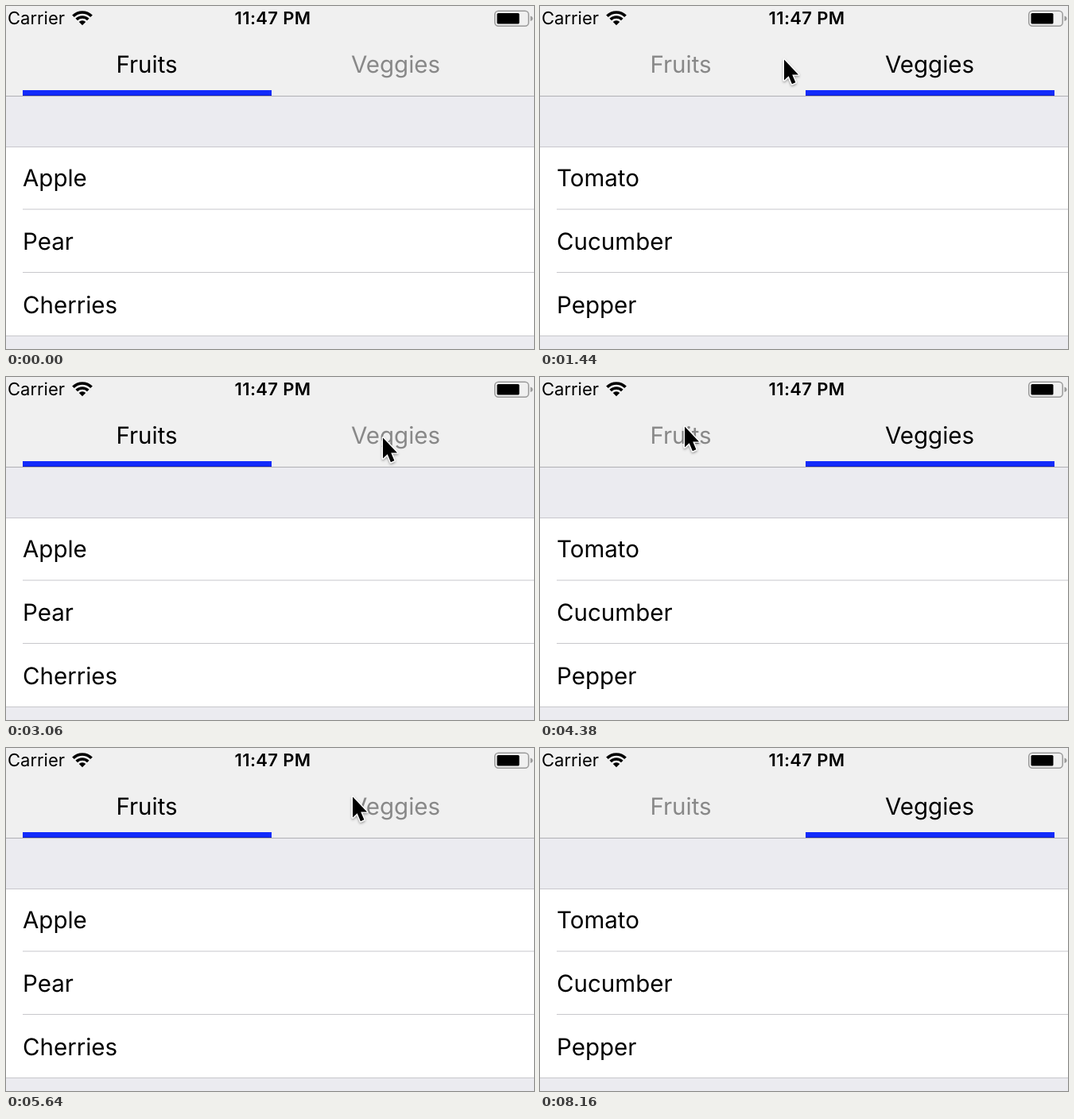
An HTML page that plays this animation: 664 by 432 pixels, repeating every 8280 ms.

```html
<!DOCTYPE html>
<html lang="en">
<head>
<meta charset="utf-8">
<title>Tabbed list</title>
<style>
  html, body { margin: 0; width: 100%; height: 100%; overflow: hidden; background: #ebebf0; }
  svg { display: block; width: 664px; height: 432px; }
  text { font-family: Inter, "Liberation Sans", sans-serif; font-size: 29.5px; text-rendering: geometricPrecision; }
  .status { font-size: 22px; }
  .clock { font-weight: 600; letter-spacing: .35px; }
  .mid { text-anchor: middle; }
  .rule { fill: #c8c7cc; }
</style>
</head>
<body>
<svg viewBox="0 0 664 432">
  <defs>
    <filter id="shadow" x="-50%" y="-30%" width="200%" height="170%">
      <feDropShadow dx="0" dy="1.5" stdDeviation="1.4" flood-color="#000" flood-opacity=".4"/>
    </filter>
  </defs>

  <rect width="664" height="432" fill="#ebebf0"/>
  <rect width="664" height="113" fill="#f0f0f0"/>
  <rect y="113" width="664" height="1" fill="#b0b0b4"/>

  <!-- Status bar -->
  <text class="status" x="2" y="23">Carrier</text>
  <g id="wifi" fill="none" stroke="#000" stroke-width="3.7"></g>
  <text class="status clock mid" x="335.5" y="23">11:47 PM</text>
  <rect x="614.75" y="6.25" width="42.5" height="19" rx="4.5" fill="none" stroke="#9a9a9a" stroke-width="1.5"/>
  <rect x="617.5" y="9" width="28" height="13.5" rx="1.5"/>
  <path d="M659.5 12.5q3 .8 3 3.3t-3 3.3z" fill="#9a9a9a"/>

  <!-- Tabs -->
  <text class="mid tab" x="177" y="84">Fruits</text>
  <text class="mid tab" x="490" y="84">Veggies</text>
  <g id="bar">
    <rect y="106" width="313" height="7" fill="#122bfb"/>
    <rect y="112" width="313" height="1" fill="#0d1cc4"/>
  </g>

  <!-- List -->
  <rect y="177" width="664" height="239" fill="#fff"/>
  <rect class="rule" y="177" width="664" height="1"/>
  <rect class="rule" x="21" y="255.5" width="643" height="1"/>
  <rect class="rule" x="21" y="335" width="643" height="1"/>
  <rect class="rule" y="415" width="664" height="1"/>
  <text class="row" x="21" y="227"></text>
  <text class="row" x="21" y="306.5"></text>
  <text class="row" x="21" y="386.5"></text>

  <g id="cursor" filter="url(#shadow)">
    <path d="M1.5 2.5V28.5L7.2 23.2L11.4 33.2L15.9 31.3L11.7 21.5H19.5Z"
      fill="#000" stroke="#fff" stroke-width="2.6" stroke-linejoin="round" paint-order="stroke"/>
  </g>
</svg>
<script>
const LOOP = 8280, STEP = 60;
const BAR = { left: 21, travel: 313, time: 290 };
const lists = [["Apple", "Pear", "Cherries"], ["Tomato", "Cucumber", "Pepper"]];

// Start times of the tab switches; they alternate between the two tabs.
const taps = [770, 2240, 3290, 4730, 6180];

// Pointer path: time, x, y.
const path = [
  [120, 611, 22], [360, 545, 54], [600, 496, 70], [900, 496, 70],
  [1440, 305.5, 65], [1800, 205, 67], [2220, 172, 70], [2400, 172, 70],
  [3060, 472.5, 74], [3420, 472.5, 74], [4380, 180.5, 60], [4500, 171, 62],
  [4920, 171, 62], [5640, 434.5, 59], [6120, 488, 56], [6360, 488, 56],
  [7200, 540, 79], [7980, 540, 79], [8040, 562, 66], [8100, 622, 30]
];

const $ = id => document.getElementById(id);
const tabs = document.querySelectorAll(".tab");
const rows = document.querySelectorAll(".row");
const smooth = u => u * u * (3 - 2 * u);
const clamp = u => Math.min(1, Math.max(0, u));

function drawWifi() {
  const cx = 96, cy = 24.3, k = Math.SQRT1_2;
  const arc = r => `M${cx - r * k} ${cy - r * k}A${r} ${r} 0 0 1 ${cx + r * k} ${cy - r * k}`;
  $("wifi").innerHTML = `<path d="${arc(16.3)}${arc(10.3)}"/>` +
    `<path d="${arc(6)}L${cx} ${cy}Z" fill="#000" stroke="none"/>`;
}

const slope = (i, axis) => (path[i + 1][axis] - path[i][axis]) / (path[i + 1][0] - path[i][0]);

// Monotone tangent, so the pointer never overshoots where it rests.
function tangent(i, axis) {
  if (i === 0) return slope(0, axis);
  if (i === path.length - 1) return slope(i - 1, axis);
  const a = slope(i - 1, axis), b = slope(i, axis);
  return a * b <= 0 ? 0 : 2 * a * b / (a + b);
}

function pointerAt(t, axis) {
  let i = 0;
  while (i < path.length - 2 && t >= path[i + 1][0]) i++;
  const p = path[i], q = path[i + 1], h = q[0] - p[0];
  const u = clamp((t - p[0]) / h), v = 1 - u;
  return p[axis] * (1 - smooth(u)) + q[axis] * smooth(u) +
    h * u * v * (v * tangent(i, axis) - u * tangent(i + 1, axis));
}

function render(t) {
  let active = 0, pos = 0;
  taps.forEach((start, i) => {
    if (t < start) return;
    active = (i + 1) % 2;
    const u = smooth(clamp((t - start) / BAR.time));
    pos = active ? u : 1 - u;
  });
  $("bar").setAttribute("transform", `translate(${Math.round(BAR.left + BAR.travel * pos)} 0)`);
  tabs.forEach((tab, i) => tab.setAttribute("fill", i === active ? "#000" : "#888"));
  rows.forEach((row, i) => { row.textContent = lists[active][i]; });

  const shown = t >= 120 && t < 8160;
  $("cursor").setAttribute("visibility", shown ? "visible" : "hidden");
  if (shown) $("cursor").setAttribute("transform", `translate(${pointerAt(t, 1)} ${pointerAt(t, 2)})`);
}

const begin = performance.now();
function tick() {
  const t = (performance.now() - begin) % LOOP;
  render(Math.floor(t / STEP) * STEP);
  requestAnimationFrame(tick);
}

drawWifi();
render(0);
requestAnimationFrame(tick);
</script>
</body>
</html>
```
